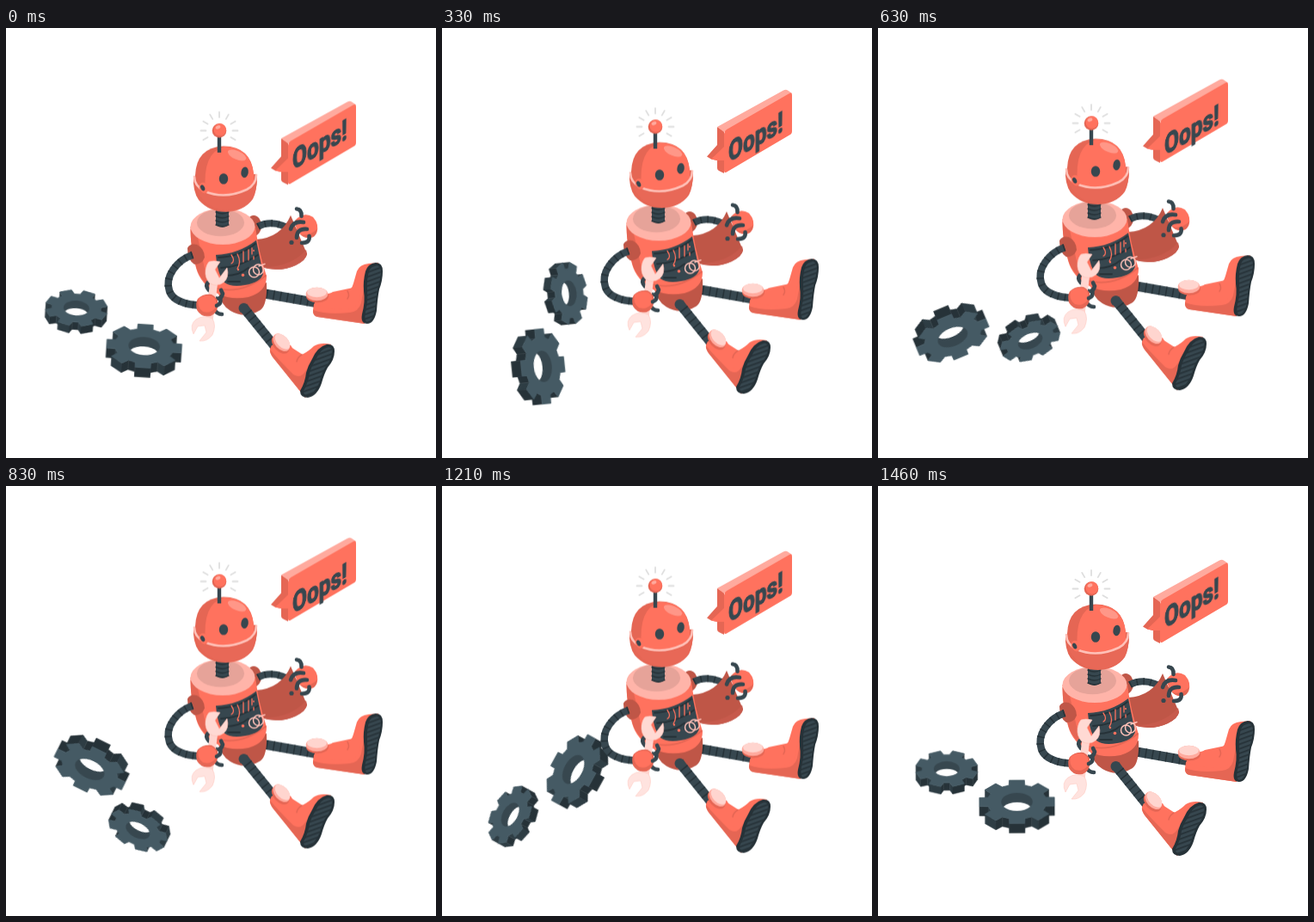
An HTML page for the animation above (1.5 s loop, 500 by 500 pixels).

```html
<!DOCTYPE html>
<html lang="en">
<head>
<meta charset="utf-8">
<title>Oops robot</title>
<style>
  html, body { margin: 0; width: 100%; height: 100%; overflow: hidden; background: #fff; }
  svg { display: block; width: 100%; height: 100%; }
  .bob { animation: bob 1.5s linear infinite; }
  #robot { --lift: -10px; }
  #bubble { --lift: -30px; }
  #word { --lift: -20px; }
  #gears { transform-origin: 125px 356px; animation: spin 1.5s linear infinite; }
  @keyframes bob {
    0%, 100% { transform: translateY(calc(var(--lift) * .02)); }
    48.2% { transform: translateY(var(--lift)); }
    97.4% { transform: translateY(0); }
  }
  @keyframes spin {
    0% { transform: rotate(3.5deg); }
    97.3% { transform: rotate(359.5deg); }
    100% { transform: rotate(363.5deg); }
  }
  .red { fill: #ff725e; }
  .shade { fill: #e56654; }
  .deep { fill: #bf5647; }
  .pink { fill: #ffaa9e; }
  .pale { fill: #ffd5cf; }
  .ink { fill: #263238; }
  .slate { fill: #37474f; }
  .line { fill: none; stroke-linecap: round; stroke-linejoin: round; }
  .tube { fill: none; stroke: #37474f; }
  .rib { fill: none; stroke: #263238; stroke-dasharray: 1.5 6.5; }
  .finger { stroke: #37474f; stroke-width: 4.6; }
  .rays { stroke: #dedede; stroke-width: 1.8; }
  text { font: 700 33.5px Roboto, "Open Sans", sans-serif; fill: #37474f; stroke: #37474f; stroke-width: 1.2; stroke-linejoin: round; }
</style>
</head>
<body>
<svg viewBox="0 0 500 500">
  <defs>
    <pattern id="tread" width="6" height="5" patternUnits="userSpaceOnUse" patternTransform="rotate(-20)">
      <rect width="6" height="5" fill="#37474f"/>
      <rect width="6" height="1.8" fill="#263238"/>
    </pattern>
  </defs>

  <g id="gears"></g>

  <g id="bubble" class="bob">
    <path class="shade" d="M320 129 328 134V183L322 180Q320 179 320 177V168L313 166.500 308 163.500 320 150Z"/>
    <path class="red" d="M313 166.500 328 152V168H320Z"/>
    <path class="pink" d="M320 129 397 86.500Q400 85 402 86.500L407 90 328 135Z"/>
    <path class="red" d="M328 137Q328 134 331 132L404 90Q407 88.500 407 92V134Q407 137 404 138.500L331 181.500Q328 183 328 180Z"/>
  </g>
  <g id="word" class="bob">
    <text transform="matrix(.73 -.421 0 1 333 166)">Oops!</text>
  </g>

  <g id="robot" class="bob">
    <!-- far arm and open hatch -->
    <ellipse class="deep" cx="288" cy="230" rx="9" ry="12"/>
    <path class="tube" data-rib d="M293 231Q312 221 337 238" stroke-width="8"/>
    <path class="deep" d="M291 246Q320 244 331 218L350 263Q349 270 337 276Q318 285 297 278Z"/>
    <path d="M297 278Q330 279 349 258L350 263Q349 270 337 276Q318 285 297 278Z" fill="#c75a4c"/>
    <circle class="slate" cx="332" cy="249.500" r="2.600"/>
    <path class="red" d="M336 224Q346 213 357 220Q365 229 361 239Q355 247 346 243Q336 237 336 224Z"/>
    <path class="shade" d="M342 240Q352 243 362 234Q361 244 353 244Q346 244 342 240Z"/>
    <path class="line finger" d="M338 210.500Q344 211 343.500 219M331 234Q334 224 346 226M338 244Q338 233 350 234M344 250Q354 250 352.500 242"/>

    <!-- far leg -->
    <path class="tube" data-rib d="M295 308 363 320" stroke-width="11"/>
    <path class="red" d="M358 321 374 309 396 306Q402 305 404 297L408 283Q411 275 422 274L433 273 417 344 362 336Q356 334 357 328Z"/>
    <path class="shade" d="M357 328Q373 334 400 331Q410 330 413 320L421 276 430 274 417 344 362 336Q357 335 357 328Z"/>
    <path class="red" d="M358 320Q370 328 398 328Q408 327 411 315L418 279 409 283 404 302 380 307Z"/>
    <path d="M397 306Q400 311 397 315" class="line" stroke="#e56654" stroke-width="1.500"/>
    <ellipse class="shade" cx="362" cy="312" rx="13" ry="7.500"/>
    <ellipse class="pink" cx="361.500" cy="309.500" rx="12.800" ry="7.800"/>
    <ellipse class="pale" cx="361.500" cy="307.500" rx="11.500" ry="5.800"/>
    <path class="ink" d="M418 283Q421 274 430 273Q438 273 438 283Q438 294 434 304Q432 314 431 329Q428 344 420 344Q412 344 414 333Q418 318 416 306Q415 295 418 283Z"/>
    <path fill="url(#tread)" d="M422 283Q425 276 431 276Q436 277 436 285Q435 294 432 304Q430 314 429 329Q426 341 420 342Q416 341 418 330Q421 319 420 306Q419 294 422 283Z"/>

    <!-- hip and near leg -->
    <path class="deep" d="M246 304Q273 314 303 296Q304 322 296 328Q278 339 261 329Q249 322 246 304Z"/>
    <path class="tube" data-rib d="M276 325Q289 341 313 371" stroke-width="11"/>
    <circle class="slate" cx="276.500" cy="326" r="6"/>
    <path class="red" d="M309 369 331 369Q337 381 344 380Q351 377 358 370Q366 365 378 368L348 430 311 384Q306 378 307 373Z"/>
    <path class="shade" d="M307 374Q313 382 334 403Q343 409 349 398L368 371 377 369 348 430 311 384Q307 379 307 374Z"/>
    <path class="red" d="M309 372Q316 380 334 398Q341 403 347 393L366 371Q359 370 345 380L331 371Z"/>
    <path d="M344 380Q339 383 338 388" class="line" stroke="#e56654" stroke-width="1.500"/>
    <g transform="rotate(47 320 366)">
      <ellipse class="shade" cx="321" cy="368" rx="12.500" ry="8"/>
      <ellipse class="pink" cx="320" cy="365.500" rx="12" ry="7.800"/>
      <ellipse class="pale" cx="320" cy="364" rx="11" ry="6.300"/>
    </g>
    <path class="ink" d="M356 385Q362 371 373 368Q382 367 382 376Q382 386 374 395Q370 402 367 413Q362 428 351 430Q342 430 342 422Q348 412 349 401Q351 393 356 385Z"/>
    <path fill="url(#tread)" d="M360 386Q366 373 374 371Q380 371 379 378Q378 387 371 395Q367 402 364 413Q359 425 351 427Q345 427 346 422Q352 411 353 401Q355 393 360 386Z"/>

    <!-- torso -->
    <path class="red" d="M214.500 231Q214 254 221 279Q226 298 246 309Q262 317 282 313Q303 307 303 289Q293 257 290 231Z"/>
    <path class="shade" d="M214.500 234Q215 260 222 281Q229 299 246 304Q236 296 231 280L223 244Z"/>
    <path d="M246 303Q274 310 302 288" class="line" stroke="#e56654" stroke-width="1.800"/>
    <ellipse cx="252" cy="231" rx="37.500" ry="21" fill="#ffb4a9"/>
    <ellipse cx="249.500" cy="226.500" rx="27.500" ry="15.800" fill="#e6a399"/>
    <path class="slate" d="M244 264Q270 263 291 247L299 286Q296 296 278 299Q262 302 254 296Q246 287 244 264Z"/>
    <path class="line" stroke="#263238" stroke-width="1.800" d="M247 267Q272 266 290 251M250 279Q273 278 293 264M252 288Q270 289 282 279M258 295H272"/>
    <path class="line" stroke="#ff725e" stroke-width="1.300" d="M262 264Q267 271 262 274M269 263Q274 272 269 280M276 260V272M282 258V270M286 256V263M288 266V269"/>
    <g class="red"><circle cx="275.500" cy="287.500" r="1.800"/><circle cx="270" cy="281" r="1.200"/><circle cx="288" cy="259" r="1"/></g>
    <g class="line" stroke="#ffc1b8" stroke-width="1.500">
      <circle cx="288.500" cy="284" r="6"/>
      <circle cx="293.500" cy="281" r="6"/>
      <path d="M294 277 301 274.500"/>
    </g>

    <!-- neck -->
    <path class="slate" d="M244 205H259V229Q252 235 244 229Z"/>
    <path class="line" stroke="#263238" stroke-width="1.400" d="M244 214Q252 218 259 214M244 219Q252 223 259 219M244 224Q252 228 259 224M244 229Q252 233 259 229"/>

    <!-- head -->
    <g id="rays" class="line rays"></g>
    <path class="shade" d="M218 172Q217 190 224 200Q236 214 256 214Q277 213 287 199Q292 190 292 170Z"/>
    <path class="shade" d="M220 184V172Q221 139 253 137.500Q285 138 288 170V182Q276 195 253 195Q231 194 220 184Z"/>
    <path class="red" d="M232 190Q228 145 254 138Q285 139 288 170V182Q276 195 253 195Q241 195 232 190Z"/>
    <path d="M218 176Q220 187 231 192Q254 202 280 190Q291 184 292 174Q292 191 285 201Q275 213 255 213Q225 210 218 176Z" fill="#e86857"/>
    <path class="line" stroke="#ffc1b8" stroke-width="2.600" d="M219 173Q219 184 231 190Q254 200 280 188Q291 182 291 171"/>
    <path d="M248 122V145" stroke="#37474f" stroke-width="4.400"/>
    <circle class="shade" cx="248" cy="119.500" r="8.300"/>
    <circle class="red" cx="248.800" cy="118.500" r="7.200"/>
    <ellipse class="pink" cx="246.500" cy="115.500" rx="3" ry="2" transform="rotate(-25 246.500 115.500)"/>
    <ellipse class="pink" cx="268.500" cy="148" rx="11.500" ry="5" opacity=".65" transform="rotate(24 268.500 148)"/>
    <ellipse class="slate" cx="253" cy="175.500" rx="5.200" ry="6.300"/>
    <ellipse class="slate" cx="277.600" cy="168" rx="4.200" ry="6.300" transform="rotate(10 277.600 168)"/>
    <ellipse class="red" cx="230" cy="186" rx="5" ry="6.500" transform="rotate(-25 230 186)"/>
    <ellipse class="slate" cx="228.700" cy="186" rx="2.300" ry="3.700" transform="rotate(-25 228.700 186)"/>

    <!-- near arm, wrench and hand -->
    <path class="deep" d="M211 256Q214 250 222 252Q231 257 231 267Q228 275 219 275Q211 270 211 256Z"/>
    <path class="tube" data-rib d="M217 264C199 270 184 289 190 306C194 318 209 322 228 323" stroke-width="8.500"/>
    <path class="line finger" d="M236 305Q231 300 235 296M243 314Q250 317 252 309L250 305M242 327Q245 333 251 333"/>
    <path d="M242 294 236 341" stroke="#ffd5cf" stroke-width="9"/>
    <path d="M236 272Q241 270 249 272L243 281 248 291 257 279Q260 290 253 296Q245 302 237 297Q231 291 232 282Q233 275 236 272Z" fill="#ffd9d3" stroke="#ffc1b8" stroke-width=".6"/>
    <path d="M240 338Q245 346 240 357Q234 365 225 364L233 354 231 346 223 347 218 356Q213 345 221 339Q230 333 240 338Z" fill="#ffe3df" stroke="#ffc9c1" stroke-width=".6"/>
    <path class="shade" d="M223 315Q229 309 239 310Q248 314 246 324Q246 331 238 335Q227 337 222 328Q220 320 223 315Z"/>
    <path class="red" d="M224 315Q231 309 240 312Q247 317 244 325Q238 333 229 330Q221 324 224 315Z"/>
    <path class="line finger" d="M245 323Q251 321 249 314"/>
  </g>
</svg>
<script>
  const NS = 'http://www.w3.org/2000/svg';
  const add = (parent, tag, attrs) => {
    const el = document.createElementNS(NS, tag);
    for (const key in attrs) el.setAttribute(key, attrs[key]);
    return parent.appendChild(el);
  };
  const poly = pts => 'M' + pts.map(p => p.map(n => n.toFixed(2))).join('L') + 'Z';

  // Isometric gear: visible side walls first, then the top face and the bore.
  function gear(cx, cy, r, depth, start) {
    const g = add(document.getElementById('gears'), 'g', { transform: `translate(${cx} ${cy})`, 'stroke-linejoin': 'round' });
    const squash = 0.577, pts = [];
    for (let i = 0; i < 8; i++) {
      for (const [turn, size] of [[-.27, .78], [-.2, 1], [.2, 1], [.27, .78]]) {
        const a = start + i * Math.PI / 4 + turn;
        pts.push([r * size * Math.cos(a), r * size * Math.sin(a) * squash]);
      }
    }
    pts.map((p, i) => [p, pts[(i + 1) % pts.length]])
      .filter(([p, q]) => q[0] < p[0])
      .sort((a, b) => a[0][1] + a[1][1] - b[0][1] - b[1][1])
      .forEach(([p, q]) => {
        const color = q[1] < p[1] - 2 ? '#2e3d44' : '#263238';
        add(g, 'path', { d: poly([p, q, [q[0], q[1] + depth], [p[0], p[1] + depth]]), fill: color, stroke: color, 'stroke-width': .5 });
      });
    add(g, 'path', { d: poly(pts), fill: '#455a64', stroke: '#455a64', 'stroke-width': .8 });

    const rx = r * .41, ry = rx * squash, mid = depth / 2;
    const x = rx * Math.sqrt(1 - (mid / ry) ** 2);
    add(g, 'ellipse', { rx, ry, fill: '#37474f' });
    add(g, 'path', { d: `M${-x} ${mid}A${rx} ${ry} 0 0 1 ${x} ${mid}A${rx} ${ry} 0 0 1 ${-x} ${mid}Z`, fill: '#fff' });
  }
  gear(80, 328.5, 36.5, 8.8, Math.PI / 8);
  gear(161.5, 367.5, 44.5, 11, 0);

  const rays = document.getElementById('rays');
  for (let deg = -210; deg <= 30; deg += 30) {
    add(rays, 'path', { d: 'M15.500 0H21.500', transform: `translate(248 119.500) rotate(${deg})` });
  }

  for (const tube of document.querySelectorAll('[data-rib]')) {
    const rib = tube.cloneNode();
    rib.setAttribute('class', 'rib');
    tube.after(rib);
  }
</script>
</body>
</html>
```
